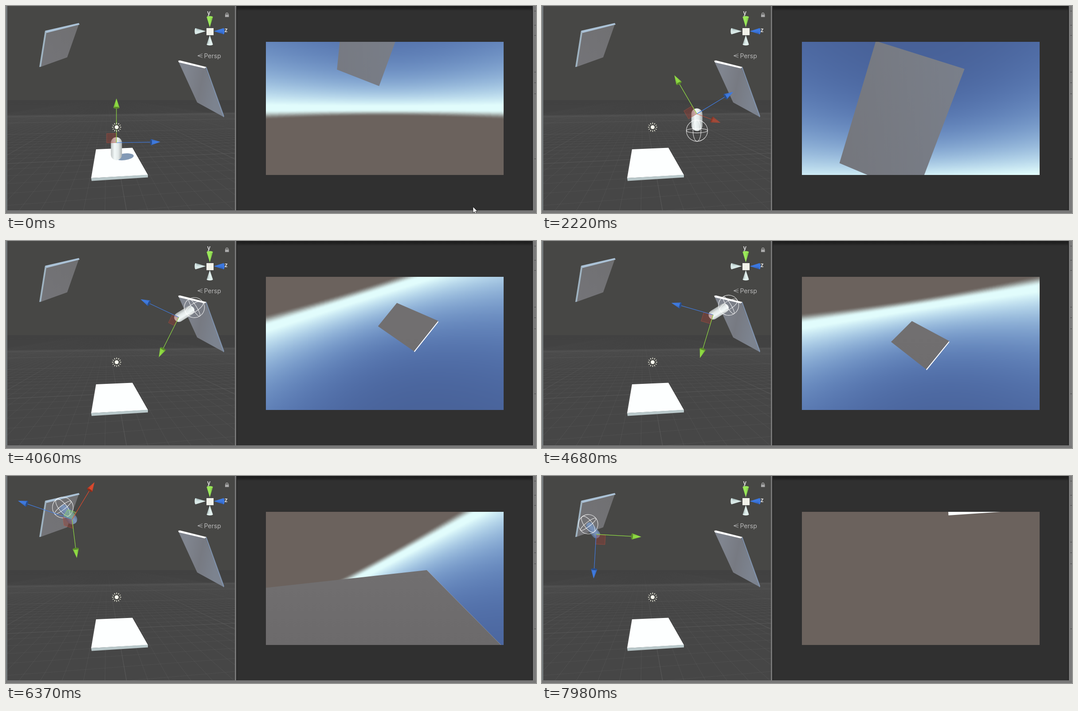
An HTML page with a canvas for the animation above (8 s loop, 1195x468 px).

```html
<!DOCTYPE html>
<html lang="en">
<head>
<meta charset="utf-8">
<title>Gravity walk</title>
<style>
html, body { margin: 0; width: 100%; height: 100%; overflow: hidden; background: #303030; }
canvas { display: block; }
</style>
</head>
<body>
<canvas id="stage" width="1195" height="468"></canvas>
<script>
const LOOP = 8000, STEP = 230 / 3;
const VIEW = { x: 586, y: 81, w: 536, h: 301, cx: 854, cy: 231, f: 260 };
const GREEN = [145, 222, 68], BLUE = [64, 124, 226], RED = [222, 74, 46];
const g = document.getElementById('stage').getContext('2d');

// Each pose is reached during its span and then held.
// head: place in the editor; body, y, z, x: [angle, length] there;
// pos and look [yaw, pitch, roll]: the player's camera in the world.
const POSES = [
  { span: [0, 0], head: [249, 309], body: [90, 27], width: [25], y: [-90, 100], z: [-1, 99], x: [20, 0],
    side: [-1], tint: [0], pos: [0, 0, 0], look: [-2.9, 0, 0] },
  { span: [560, 910], head: [248, 307], body: [90, 29], y: [-112, 97], z: [-20, 100], side: [1], look: [0, 22, 0] },
  { span: [1600, 2220], head: [349, 244], body: [90, 26], y: [-120, 101], z: [-31, 96], x: [21, 57],
    side: [-1], pos: [-17, 63, 97], look: [0, 32.5, -2.3] },
  { span: [2220, 2760], head: [410, 204], body: [-32, 32], width: [21], y: [-189, 94], z: [-101, 79], x: [-85, 67],
    pos: [-16.4, 99.5, 175], look: [-87.5, 59.2, 114] },
  { span: [3300, 4250], head: [386, 167], body: [-32, 29], y: [-253, 102], z: [-164, 98], x: [-85, 0],
    side: [1], pos: [-16, 135, 150], look: [-180, 17.4, 171] },
  { span: [4690, 5350], head: [149, 98], body: [-128, 28], width: [23], y: [-277, 88], z: [-161, 129], x: [-59, 98],
    tint: [1], pos: [-13.6, 217, -121.6], look: [-233.7, 6.2, 151.3] },
  { span: [6500, 7980], head: [122, 132], body: [-128, 23], width: [18], y: [-357, 102], z: [-267, 100], x: [-110, 0],
    pos: [-95, 185, -149.7], look: [-180, -86.6, 176.1] }
];
POSES.forEach((p, i) => { if (i) POSES[i] = { ...POSES[i - 1], ...p }; });

const mix = (a, b, u) => a + (b - a) * u;
const clamp = (v, lo = 0, hi = 1) => Math.max(lo, Math.min(hi, v));
const smooth = u => u * u * (3 - 2 * u);
const rad = deg => deg * Math.PI / 180;
const rgb = (c, k = 1) => `rgb(${c.map(v => Math.round(v * k)).join(',')})`;
const reach = ([x, y], [deg, len]) => [x + len * Math.cos(rad(deg)), y + len * Math.sin(rad(deg))];

function poseAt(t) {
  let i = POSES.length - 1;
  while (i > 1 && t < POSES[i].span[0]) i--;
  const a = POSES[i - 1], b = POSES[i], [from, to] = b.span;
  const u = clamp((t - from) / (to - from)), e = mix(u, smooth(u), 0.5);
  const pose = {};
  for (const key in b) pose[key] = b[key].map((v, k) => mix(a[key][k], v, e));
  return pose;
}

// ---- drawing helpers ----
function trace(c, pts) {
  c.beginPath();
  for (const [x, y] of pts) c.lineTo(x, y);
  c.closePath();
}

function poly(c, pts, fill) {
  trace(c, pts);
  c.fillStyle = fill;
  c.fill();
}

function line(c, x1, y1, x2, y2, color, width = 1) {
  c.beginPath();
  c.moveTo(x1, y1);
  c.lineTo(x2, y2);
  c.strokeStyle = color;
  c.lineWidth = width;
  c.stroke();
}

function ellipse(c, x, y, rx, ry, turned = 0) {
  c.beginPath();
  c.ellipse(x, y, rx, ry, turned, 0, 7);
}

function disc(c, x, y, rx, ry, fill, turned) {
  ellipse(c, x, y, rx, ry, turned);
  c.fillStyle = fill;
  c.fill();
}

function linear(c, x1, y1, x2, y2, ...colors) {
  const gr = c.createLinearGradient(x1, y1, x2, y2);
  colors.forEach((s, i) => gr.addColorStop(i / (colors.length - 1), s));
  return gr;
}

// ---- the world as the player sees it ----
function turn(x, y, deg) {
  const c = Math.cos(rad(deg)), s = Math.sin(rad(deg));
  return [x * c + y * s, y * c - x * s];
}

function toCamera(point, { pos, look: [yaw, pitch, roll] }) {
  let [x, y, z] = point.map((v, i) => v - pos[i]);
  [z, x] = turn(z, x, yaw);
  [z, y] = turn(z, y, pitch);
  [x, y] = turn(x, y, roll);
  return [x, y, z];
}

function toWorld([x, y, z], { pos, look: [yaw, pitch, roll] }) {
  [x, y] = turn(x, y, -roll);
  [z, y] = turn(z, y, -pitch);
  [z, x] = turn(z, x, -yaw);
  return [x + pos[0], y + pos[1], z + pos[2]];
}

// Finds the flat panel whose corners appear at these pixels; `size` is its first edge.
function panel(quad, size, pose) {
  const p = quad.map(([x, y]) => [x - VIEW.cx, VIEW.cy - y]);
  const corners = p.map(([x, y], i) => {
    const [a, b, c] = p.filter((_, k) => k !== i);
    const depth = Math.abs((b[0] - a[0]) * (c[1] - a[1]) - (b[1] - a[1]) * (c[0] - a[0]));
    return [x * depth, y * depth, VIEW.f * depth];
  });
  const k = size / Math.hypot(...corners[0].map((v, i) => v - corners[1][i]));
  return corners.map(c => toWorld(c.map(v => v * k), pose));
}

const wall = panel([[780, 93], [887, 136], [828, 282], [737, 245]], 98.5, POSES[1]);
const roof = panel([[834, 181], [918, 226], [866, 290], [787, 228]], 147.8, POSES[4]);
const floor = [[-35, -38, -49], [113, -38, -49], [113, -38, 49], [-35, -38, 49]];
// The bright narrow side of the roof panel.
const rim = [roof[1], roof[2], ...[roof[2], roof[1]].map(([x, y, z]) => [x + 1, y + 5, z - 3.6])];

function project(points, pose) {
  const near = 4, out = [];
  const cam = points.map(p => toCamera(p, pose));
  cam.forEach((b, i) => {
    const a = cam[(i + cam.length - 1) % cam.length];
    if (a[2] > near !== b[2] > near) {
      const u = (near - a[2]) / (b[2] - a[2]);
      out.push(a.map((v, k) => mix(v, b[k], u)));
    }
    if (b[2] > near) out.push(b);
  });
  return out.map(([x, y, z]) => [VIEW.cx + VIEW.f * x / z, VIEW.cy - VIEW.f * y / z]);
}

// Haze fades into deep blue with height; below the horizon lies brown ground.
const SHADES = 800, LOWEST = -0.12;
const HAZE = [225, 252, 252], DEEP = [68, 90, 134], FADE = [0.23, 0.275, 0.45], SOIL = [107, 98, 93];
const shades = Array.from({ length: SHADES + 1 }, (_, i) => {
  const s = mix(LOWEST, 1, i / SHADES);
  const ground = smooth(clamp((-0.012 - s) / 0.058));
  const [r, gr, b] = HAZE.map((haze, k) => {
    const air = mix(DEEP[k], haze, Math.exp(-Math.max(0, s - 0.02) / FADE[k]));
    return Math.round(mix(air, SOIL[k], ground));
  });
  return (255 << 24 | b << 16 | gr << 8 | r) >>> 0;
});
const sky = document.createElement('canvas');
sky.width = VIEW.w / 2;
sky.height = 151;
const skyCtx = sky.getContext('2d');
const skyImage = skyCtx.createImageData(sky.width, sky.height);
const skyPixels = new Uint32Array(skyImage.data.buffer);

function paintSky(look) {
  const [ux, uy, uz] = toCamera([0, 1, 0], { pos: [0, 0, 0], look });
  for (let j = 0, p = 0; j < sky.height; j++) {
    const y = 149 - 2 * j;
    for (let i = 0; i < sky.width; i++, p++) {
      const x = 2 * i + 1 - VIEW.w / 2;
      const s = (ux * x + uy * y + uz * VIEW.f) / Math.sqrt(x * x + y * y + VIEW.f * VIEW.f);
      skyPixels[p] = shades[Math.round(clamp((s - LOWEST) / (1 - LOWEST)) * SHADES)];
    }
  }
  skyCtx.putImageData(skyImage, 0, 0);
}

function gameView(pose) {
  paintSky(pose.look);
  g.save();
  g.beginPath();
  g.rect(VIEW.x, VIEW.y, VIEW.w, VIEW.h);
  g.clip();
  g.drawImage(sky, VIEW.x, VIEW.y, VIEW.w, 302);
  poly(g, project(floor, pose), '#fcffff');
  poly(g, project(wall, pose), linear(g, 586, 381, 1122, 260, '#737479', '#7c8390'));
  poly(g, project(rim, pose), '#fff');
  poly(g, project(roof, pose), linear(g, 0, 215, 0, 381, '#716f70', '#6c6a6b'));
  g.restore();
}

// ---- parts of the editor that never move ----
function paintGrid(c) {
  c.fillStyle = '#474745';
  c.fillRect(0, 0, 519, 468);
  c.fillStyle = linear(c, 0, 213, 0, 330, '#414141', '#444', '#464646');
  c.fillRect(0, 213, 519, 255);
  c.save();
  c.beginPath();
  c.rect(3, 214, 513, 248);
  c.clip();
  const fade = linear(c, 0, 214, 0, 462, 'rgba(105,105,105,0)', 'rgba(105,105,105,.4)', 'rgba(110,110,110,.45)');
  for (let k = -34; k <= 34; k++) {
    const slope = 0.175 + k * 0.19;
    line(c, 227, 207, 227 + 260 * slope, 467, fade, k % 10 ? 0.6 : 1.2);
  }
  for (let k = 0; k < 40; k++) {
    const h = 2000 / (7.7 + k * 1.1), tilt = h * 0.00033;
    line(c, 0, 205 + h + 250 * tilt, 519, 205 + h - 269 * tilt,
      `rgba(108,108,108,${k % 10 === 6 ? 0.6 : 0.28})`, 0.8);
  }
  c.restore();
}

function paintSlabs(c) {
  poly(c, [[88, 57], [165, 39], [138, 116], [77, 138]], linear(c, 80, 130, 160, 45, '#747478', '#707072'));
  poly(c, [[88, 56], [164, 38.5], [166, 42], [91, 61]], '#abc2d6');
  poly(c, [[88, 56], [91, 61], [79, 137], [75, 138]], '#9fb3c1');
  poly(c, [[389, 126], [450, 140], [491, 251], [431, 218]], linear(c, 400, 180, 475, 195, '#80858f', '#777a82', '#7c838f'));
  poly(c, [[450, 139], [452, 138], [492, 249], [490.5, 252]], '#8093ae');
  poly(c, [[388, 124], [392, 123], [452, 138], [448, 141], [390, 127.5]], '#fff');
  poly(c, [[203, 324], [285, 320.5], [320, 382], [192, 389]], '#fdffff');
  poly(c, [[192, 389], [320, 381.5], [320, 387.5], [193, 395.5]], '#b9c8ca');
}

function paintCompass(c) {
  const cone = (quarter, base, color, dark) => {
    c.save();
    c.translate(459.5, 57);
    c.rotate(quarter * Math.PI / 2);
    poly(c, [[-7, -base], [7, -base], [0, -9]], linear(c, -7, 0, 7, 0, color, color, dark));
    disc(c, 0, -base, 7, 2.2, color);
    c.restore();
  };
  cone(0, 32, '#9be85a', '#73b83f');
  cone(1, 31, '#3c78e0', '#2b56a8');
  cone(2, 30, '#e0eeec', '#9fb0af');
  cone(3, 32, '#d9e9e7', '#93a9a8');
  c.fillStyle = '#f2f2ea';
  c.fillRect(452, 50, 16, 16);
  c.fillStyle = '#e6e6e6';
  c.font = '600 13px Inter, sans-serif';
  c.fillText('y', 453.5, 20);
  c.fillText('z', 492.5, 59);
  c.fillStyle = '#b9b9b9';
  c.font = '14px Inter, sans-serif';
  c.fillText('Persp', 446.5, 118);
  for (const dy of [-4.5, 0, 4.5]) line(c, 432, 112.5, 443, 112.5 + dy, '#b0b0b0');
  c.fillStyle = '#a8a8a8';
  c.fillRect(494, 19, 8.5, 6);
  c.beginPath();
  c.arc(498.2, 18.5, 2.8, Math.PI, 0);
  c.strokeStyle = '#a8a8a8';
  c.lineWidth = 1.4;
  c.stroke();
}

function paintFrame(c) {
  const box = (color, x, y, w, h) => { c.fillStyle = color; c.fillRect(x, y, w, h); };
  box('#303030', 519, 0, 669, 462);
  box(linear(c, 0, 0, 0, 11, '#1b1b1b', '#222', '#303030'), 519, 0, 669, 11);
  box('#262626', 519, 0, 2, 462);
  box('#777', 516, 0, 3, 464);
  box('#757a7c', 0, 0, 3, 464);
  box('#777', 0, 462, 1195, 6);
  box('#242424', 1186, 0, 2, 462);
  box('#7a7a7a', 1188, 0, 7, 464);
  for (const y of [11, 43, 66, 149, 173, 198, 345]) box('#4c4c4c', 1191, y, 4, 1);
}

const still = document.createElement('canvas');
still.width = 1195;
still.height = 468;
[paintGrid, paintSlabs, paintCompass, paintFrame].forEach(paint => paint(still.getContext('2d')));

// ---- moving parts of the editor ----
function sun() {
  for (let i = 0; i < 12; i++) {
    const [a, b] = [7, 10.5].map(r => reach([249.5, 274], [i * 30, r]));
    line(g, ...a, ...b, '#f4f4e2', 1.4);
  }
  disc(g, 249.5, 274, 5, 5, '#fffff0');
  g.strokeStyle = '#33332f';
  g.lineWidth = 1;
  g.stroke();
}

function arrow([x, y], [deg, len], color, alpha = 1) {
  g.save();
  g.globalAlpha = alpha;
  g.translate(x, y);
  g.rotate(rad(deg));
  line(g, 0, 0, len - 18, 0, rgb(color), 1.2);
  poly(g, [[len, 0], [len - 21, -7], [len - 21, 7]],
    linear(g, 0, -7, 0, 7, rgb(color, 0.8), rgb(color), rgb(color, 0.88)));
  disc(g, len - 21, 0, 2.2, 7, rgb(color, 0.62));
  g.restore();
}

function player({ head, body, width: [w], tint: [tint] }, grounded) {
  if (grounded) disc(g, 267, 341, 21, 7.5, '#8299b5', -0.12);
  const [deg, len] = body;
  const lit = [242, 248, 248], shady = [124, 149, 186];
  const tone = k => rgb(lit.map((v, i) => mix(v, shady[i], tint)), k);
  g.save();
  g.translate(...head);
  g.rotate(rad(deg - 90));
  g.beginPath();
  g.roundRect(-w / 2, -w / 2, w, len + w, w / 2);
  g.fillStyle = linear(g, -w / 2, 0, w / 2, 0, tone(0.79), tone(1), tone(0.94), tone(0.7));
  g.fill();
  g.restore();
  if (grounded) return;

  const r = w * 0.3 + 16.5, flat = rad(deg - 90);
  const [cx, cy] = reach(head, [deg, len + mix(12, 6, tint)]);
  g.strokeStyle = 'rgba(255,255,255,.85)';
  g.lineWidth = 1.1;
  for (const [rx, ry] of [[r, r], [r, 5], [9, r]]) {
    ellipse(g, cx, cy, rx, ry, flat);
    g.stroke();
  }
}

// A square handle spanned by two axes.
function handle(o, a, b, fill, edge) {
  const p = reach(o, a), q = reach(o, b);
  poly(g, [o, p, [p[0] + q[0] - o[0], p[1] + q[1] - o[1]], q], fill);
  g.strokeStyle = edge;
  g.lineWidth = 1;
  g.stroke();
}

function gizmo({ head, x, y, z, side: [side], tint: [tint] }) {
  const seen = clamp((x[1] - 42) / 25);
  handle(head, [y[0], 21], [z[0], 22 * side], 'rgba(150,62,52,.42)', 'rgba(190,80,62,.55)');
  g.globalAlpha = seen * tint;
  handle(head, [x[0], 18], [z[0], 20], 'rgba(130,190,110,.4)', '#8fdc60');
  g.globalAlpha = 1;
  arrow(head, x, RED, seen);
  arrow(head, z, BLUE);
  arrow(head, y, GREEN);
}

function cursor(t) {
  const u = clamp(t / 306), x = mix(1053, 811, u), y = mix(454, 225, u);
  const shape = [[0, 0], [0, 14], [3.3, 11], [5.5, 16], [7.8, 15], [5.6, 10.2], [10, 10]];
  poly(g, shape.map(([dx, dy]) => [x + dx, y + dy]), '#fff');
  g.strokeStyle = '#111';
  g.lineWidth = 0.8;
  g.stroke();
}

function draw(ms) {
  const t = Math.floor((ms + 9) / STEP) * STEP;
  const pose = poseAt(t);
  g.drawImage(still, 0, 0);
  g.save();
  g.beginPath();
  g.rect(3, 0, 513, 462);
  g.clip();
  player(pose, t < 1600);
  gizmo(pose);
  sun();
  g.restore();
  gameView(pose);
  if (t < 600) cursor(t);
}

function tick() {
  draw(performance.now() % LOOP);
  requestAnimationFrame(tick);
}
tick();
</script>
</body>
</html>
```
